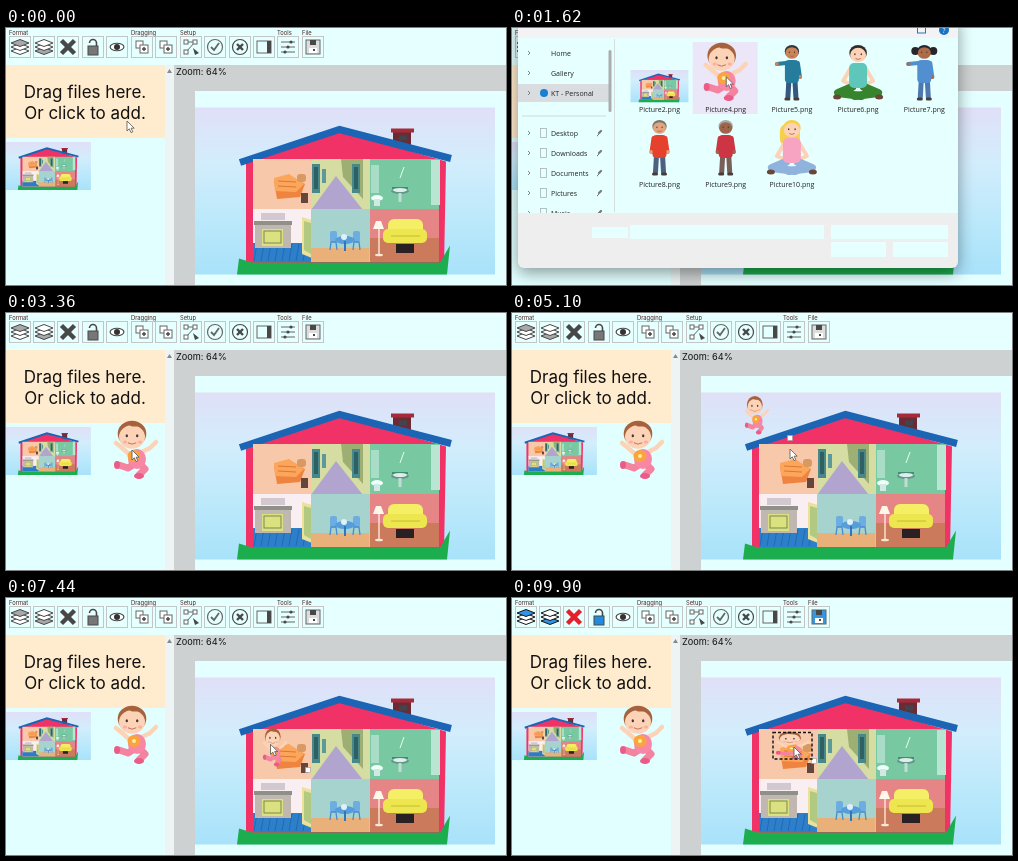
An HTML page with a canvas that plays this animation: 500 by 257 pixels, repeating every 9960 ms.

```html
<!DOCTYPE html>
<html lang="en">
<head>
<meta charset="utf-8">
<title>Doll house editor</title>
<style>
html, body { margin: 0; width: 100%; height: 100%; overflow: hidden; background: #e0ffff; }
canvas { display: block; width: 500px; height: 257px; }
</style>
</head>
<body>
<canvas id="stage" width="500" height="257"></canvas>
<script>
const LOOP = 9960, GLIDE = 600;
const UI = 'Inter, Arial, sans-serif';
const SYS = '"Open Sans", "Noto Sans", sans-serif';
const SKIN = '#fcd3b6', PAPER = '#e6ffff', INK = '#484848';
const c = document.getElementById('stage').getContext('2d');

const mix = (a, b, u) => a + (b - a) * u;
function ease(t, from, to) {
  const u = Math.min(1, Math.max(0, (t - from) / (to - from)));
  return u * u * (3 - 2 * u);
}
function rect(x, y, w, h, fill, r = 0) {
  c.fillStyle = fill;
  c.beginPath();
  c.roundRect(x, y, w, h, r);
  c.fill();
}
function oval(x, y, rx, ry, fill) {
  c.fillStyle = fill;
  c.beginPath();
  c.ellipse(x, y, rx, ry, 0, 0, 7);
  c.fill();
}
function trace(pts) {
  c.beginPath();
  for (let i = 0; i < pts.length; i += 2) c.lineTo(pts[i], pts[i + 1]);
}
function poly(fill, ...pts) {
  trace(pts);
  c.fillStyle = fill;
  c.fill();
}
function line(color, width, ...pts) {
  trace(pts);
  c.strokeStyle = color;
  c.lineWidth = width;
  c.stroke();
}
function limb(...args) {
  c.lineCap = c.lineJoin = 'round';
  line(...args);
  c.lineCap = 'butt';
  c.lineJoin = 'miter';
}
function frame(x, y, w, h, color, width = 1) {
  c.strokeStyle = color;
  c.lineWidth = width;
  c.strokeRect(x, y, w, h);
}
function ring(r, color, width) {
  c.strokeStyle = color;
  c.lineWidth = width;
  c.beginPath();
  c.arc(0, 0, r, 0, 7);
  c.stroke();
}
function text(str, x, y, size, family = UI, align = 'left', color = '#111') {
  c.font = `${size}px ${family}`;
  c.fillStyle = color;
  c.textAlign = align;
  c.fillText(str, x, y);
}
function at(x, y, sx, sy, draw) {
  c.save();
  c.translate(x, y);
  c.scale(sx, sy);
  draw();
  c.restore();
}

// Each room is drawn in its own 60 x 51 box
const rooms = [
  ['#f8c8aa', bedroom], ['#d5dda3', hall], ['#78c8a2', bathroom],
  ['#f9eef2', kitchen], ['#a6d3cd', dining], ['#e58585', lounge]
];
function bedroom() {
  poly('#ee8440', 21, 22, 36, 16, 52, 25, 47, 38, 24, 40);
  poly('#fca65c', 21, 19, 36, 15, 51, 25, 43, 33, 22, 32);
  for (const y of [22, 27]) line('#dc7834', 1, 25, y, 43, y + 1);
  rect(44, 15, 9, 8, '#d89a62', 3);
  rect(48, 34, 7, 10, '#65463a');
}
function hall() {
  poly('#9daf72', 30, 0, 52, 0, 52, 40, 32, 18);
  for (const x of [1, 41]) {
    rect(x, 5, 8, 29, '#47888a');
    rect(x + 2, 8, 4, 22, '#2e6064');
  }
  rect(11, 10, 4, 14, '#5b999a');
  poly('#b1a5d0', 25, 17, 52, 51, 0, 51);
}
function bathroom() {
  rect(61, 1, 9, 45, '#b9e6d2');
  rect(1, 6, 8, 28, '#a9ddc8');
  line('#e4fff2', 1, 34, 8, 30, 19);
  line('#448c78', 2, 22, 29, 38, 29);
  oval(30, 32, 9, 3, '#67958c');
  oval(30, 31, 7, 2, '#dcefe9');
  line('#c2dcd5', 3, 30, 34, 30, 43);
  oval(7, 39, 6, 3, '#effff9');
  rect(4, 40, 6, 7, '#d2e8e2');
}
function kitchen() {
  rect(0, 34, 59, 19, '#2e7fca');
  for (let x = 4; x < 59; x += 7) line('#1d65ae', .8, x, 35, x - 3, 52);
  rect(2, 13, 36, 26, '#c0b8b0');
  rect(1, 12, 38, 4, '#8f9188');
  rect(9, 20, 21, 17, '#dbe17e');
  frame(11, 22, 17, 12, '#7d8758');
  rect(8, 4, 24, 7, '#d1c8d0');
  poly('#ece19b', 49, 8, 59, 11, 59, 49, 49, 45);
  poly('#b2c982', 51, 12, 58, 14, 58, 45, 51, 41);
}
function dining() {
  rect(0, 39, 58, 14, '#e9b179');
  for (const x of [22, 45]) {
    rect(x - 3, 22, 7, 11, '#6caee3', 2);
    line('#4a8ccb', 1.3, x - 3, 41, x - 2, 33, x + 3, 33, x + 4, 41);
  }
  oval(34, 31, 10, 4, '#569ddb');
  line('#3276b8', 2, 34, 32, 34, 42);
  oval(33, 28, 3, 3, '#dff0fa');
}
function lounge() {
  rect(0, 29, 69, 24, '#cb7a5c');
  rect(18, 10, 35, 19, '#f4ef64', 6);
  rect(13, 20, 44, 14, '#eee64f', 5);
  line('#c4ba36', 1, 21, 27, 50, 27);
  line('#fff0e0', 1.3, 9, 18, 9, 45);
  poly('#fff8ea', 6, 12, 11, 12, 14, 20, 3, 20);
  oval(9, 46, 4, 1.3, '#f7e8d5');
  rect(26, 35, 18, 9, '#292024');
}

// The picture: 300 x 167
function house() {
  const sky = c.createLinearGradient(0, 0, 0, 167);
  ['#e0e0f7', '#d2edfc', '#bce9fb', '#a8e2fa'].forEach((color, i) => sky.addColorStop(i / 3, color));
  rect(0, 0, 300, 167, sky);
  rect(198, 24, 18, 20, '#6b2b35');
  rect(196, 21, 23, 4, '#a62a3a');
  rect(204, 28, 8, 5, '#43454d');
  poly('#f03266', 144.5, 23, 251, 54, 249, 159, 51, 159, 51, 54);
  line('#1c64b4', 7, 45, 55, 144.5, 22, 256, 51);
  poly('#1cad4e', 42, 167, 44, 151, 57, 155, 245, 155, 255, 138, 252, 167);
  rooms.forEach(([wall, furnish], i) => {
    const x = [58, 116, 175][i % 3], y = i < 3 ? 51.5 : 101.5;
    rect(x, y, i % 3 < 2 ? 59 : 69, 53, wall);
    at(x, y, 1, 1, furnish);
  });
}

function face(x, y, r, hair, skin = SKIN) {
  oval(x, y - r * .25, r * 1.1, r, hair);
  oval(x, y, r, r * .9, skin);
  for (const side of [-1, 1]) oval(x + side * r * .4, y - r * .1, r * .09, r * .12, '#443333');
  limb('#b85a50', .8, x - r * .3, y + r * .45, x, y + r * .55, x + r * .3, y + r * .45);
}

// Figures are about 56 tall and centred on the origin
function baby() {
  limb(SKIN, 4.5, -7, 3, -15, -4, -20, -8);
  limb(SKIN, 4.5, 4, 2, 14, -3, 20, -9);
  limb('#f4839f', 7, 0, 12, -8, 17, -17, 14);
  limb('#f4839f', 7, 3, 12, 9, 18, 3, 24);
  oval(-19, 14, 3, 4, '#ea5c87');
  oval(3, 25, 5, 3, '#ea5c87');
  oval(1, 8, 9, 10, '#f787a5');
  oval(-2, 5, 6.5, 6, '#fba43e');
  oval(-2, 5, 2, 2, '#fff0a0');
  face(-4, -14, 13, '#a5623c');
  oval(-1, -26, 5, 1.5, '#a5623c');
  for (const x of [-11, 4]) oval(x, -9, 2.2, 1.6, '#f9b0a4');
}
function standing(hair, shirt, legs, skin, reach = 0) {
  for (const side of [-1, 1]) {
    limb(legs, 5, side * 3, 7, side * 4, 24);
    limb('#493c38', 3, side * 3, 26, side * 6, 26);
    const hand = side < 0 && reach ? [-7 - reach, -9] : [side * 8, 4];
    limb(shirt, 4, side * 6, -10, ...hand);
    oval(...hand, 2, 2, skin);
  }
  rect(-7, -13, 14, 23, shirt, 4);
  face(0, -20, 6.5, hair, skin);
}
function sitting(hair, shirt, legs) {
  for (const side of [-1, 1]) {
    limb(SKIN, 4, side * 8, -4, side * 15, 8, side * 6, 12);
    limb(legs, 8, side * 6, 14, side * 20, 20, side * -3, 23);
    oval(side * 21, 24, 4, 2.5, '#694636');
  }
  rect(-9, -10, 18, 25, shirt, 5);
  face(0, -18, 8, hair);
}
function bunches() {
  for (const x of [-9, 9]) oval(x, -22, 4, 4, '#26252b');
  standing('#26252b', '#518fd0', '#4f78b0', '#ad6d48', 9);
}
function longHair() {
  rect(-12, -24, 20, 22, '#f6d04d', 7);
  sitting('#f6d04d', '#f7a4c2', '#8fb3dd');
}
const people = [
  baby,
  () => standing('#343438', '#267c9c', '#365780', '#c98558', 8),
  () => sitting('#312b2a', '#5fc7b9', '#36852d'),
  bunches,
  () => standing('#77736e', '#e5412d', '#4c607f', '#e2a57e'),
  () => standing('#a9a9a9', '#cd3545', '#785f58', '#9d6549'),
  longHair
];

// Toolbar icons are centred on the origin
function layers(filled) {
  return tint => {
    for (let i = 2; i >= 0; i--) {
      const y = i * 4 - 4;
      const fill = i === filled ? tint('#2f93e6', '#a8a8a8') : '#fff';
      const sheet = [-9, y, 0, y - 3.5, 9, y, 0, y + 3.5, -9, y];
      poly(fill, ...sheet);
      line(tint('#161616', INK), 1, ...sheet);
    }
  };
}
function cross(color, width, r) {
  line(color, width, -r, -r, r, r);
  line(color, width, r, -r, -r, r);
}
function padlock(tint) {
  c.strokeStyle = INK;
  c.lineWidth = 1.6;
  c.beginPath();
  c.arc(0, -4, 3.5, Math.PI, 0);
  c.lineTo(3.5, 0);
  c.stroke();
  rect(-5, -1, 10, 9, tint('#218be0', '#777'), 1);
  frame(-5, -1, 10, 9, INK);
}
function eye() {
  oval(0, 0, 7.5, 4.2, INK);
  oval(0, 0, 6.3, 3.2, '#fff');
  oval(0, 0, 3, 3, '#333');
}
function copies() {
  for (const [p, size] of [[-6, 7], [-2, 8]]) {
    rect(p, p, size, size, '#fff');
    frame(p, p, size, size, '#666');
  }
  line(INK, 1.5, 0, 2, 4, 2);
  line(INK, 1.5, 2, 0, 2, 4);
}
function nodes() {
  line('#666', 1, -5, 5, 4, -5, -5, -5);
  for (const [x, y] of [[-5, -5], [4, -5], [-5, 5]]) {
    rect(x - 2, y - 2, 4, 4, '#fff');
    frame(x - 2, y - 2, 4, 4, '#666');
  }
  poly(INK, 2, 1, 8, 6, 4, 8);
}
function sliders() {
  for (let i = -1; i < 2; i++) {
    line('#666', 1, -7, i * 5, 7, i * 5);
    oval(i * -3, i * 5, 1.6, 1.6, INK);
  }
}
function floppy(tint) {
  rect(-7, -7, 14, 14, tint('#3596e2', '#ddd'), 1);
  frame(-7, -7, 14, 14, '#666');
  rect(-3, -7, 6, 5, INK);
  rect(-4, 1, 8, 5, '#fff');
  rect(0, 2, 2, 2, INK);
}
const icons = [
  layers(0), layers(2),
  tint => cross(tint('#e5202a', INK), 4.5, 6.5),
  padlock, eye, copies, copies, nodes,
  () => { ring(7.5, '#666', 1.2); line('#666', 1.8, -4, 0, -1, 3, 4, -4); },
  () => { ring(7.5, INK, 1.2); cross(INK, 2.4, 3); },
  () => { frame(-7, -6, 14, 12, '#666'); rect(3, -6, 4, 12, INK); },
  sliders, floppy
];
const groups = { Format: 0, Dragging: 5, Setup: 7, Tools: 11, File: 12 };
const buttonX = i => Math.floor(3 + 24.45 * i);

function toolbar(active) {
  const tint = (on, off) => active ? on : off;
  rect(0, 0, 500, 37, PAPER);
  icons.forEach((icon, i) => {
    frame(buttonX(i) + .5, 8.5, 21, 21, '#c2c6c6');
    at(buttonX(i) + 11, 19, 1, 1, () => icon(tint));
  });
  for (const name in groups) text(name, buttonX(groups[name]), 6.6, 5.8, UI, 'left', '#4a2222');
}
function page(t, active) {
  rect(0, 0, 500, 257, '#e2ffff');
  toolbar(active);
  rect(0, 37, 159, 73, '#ffebcd');
  text('Drag files here.', 79, 69.6, 17, UI, 'center');
  text('Or click to add.', 79, 90.6, 17, UI, 'center');
  at(0, 114, .283, .287, house);
  if (t > 2500) at(130, 138, 1, 1, baby);
  rect(159, 37, 9, 220, '#eef4f4');
  poly('#888', 161, 45, 163.5, 41, 166, 45);
  rect(168, 37, 332, 220, '#cdd1d1');
  text('Zoom: 64%', 170, 46.8, 9.2);
  rect(189, 63, 311, 194, '#e4ffff');
  at(189, 79.5, 1, 1, house);
}

function sidebar() {
  c.save();
  c.beginPath();
  c.rect(6, 10, 95, 175);
  c.clip();
  rect(6, 56, 91, 18, '#d9dde0');
  const names = ['Home', 'Gallery', 'KT - Personal', '', 'Desktop', 'Downloads', 'Documents', 'Pictures', 'Music'];
  names.forEach((name, i) => {
    const y = 25 + i * 20;
    if (!name) return line('#d3dada', 1, 10, y + 3, 94, y + 3);
    line('#666', .8, 16, y - 2, 18, y, 16, y + 2);
    text(name, 39, y + 2.7, 7, SYS, 'left', '#222');
    if (i < 4) return;
    frame(28.5, y - 4.5, 6, 9, '#aab3b5', .8);
    limb('#777', 1, 85, y + 3, 87, y + 1);
    limb('#777', 2.2, 87, y, 89, y - 2);
  });
  oval(32, 65, 4, 4, '#1680d2');
  c.restore();
  rect(96.5, 22, 3, 62, '#a9adad', 1.5);
  line('#d5dddd', 1, 102.5, 11, 102.5, 184);
}
function files(mx, my) {
  for (let i = 0; i < 8; i++) {
    const x = 147.5 + (i % 5) * 66.2, y = i < 5 ? 45 : 120;
    if (Math.abs(mx - x) < 33 && Math.abs(my - y - 5) < 36) rect(x - 33, y - 31, 65, 72, '#ebe6f8');
    if (i) at(x, y, 1, 1, people[i - 1]);
    else at(x - 29, 42, .193, .193, house);
    text(`Picture${i ? i + 3 : 2}.png`, x, y + 39, 7, SYS, 'center', '#222');
  }
}
function dialog(mx, my) {
  c.save();
  c.shadowColor = 'rgba(0,0,0,.4)';
  c.shadowBlur = 16;
  c.shadowOffsetY = 5;
  rect(6, -12, 440, 252, '#eeeeee', 6);
  c.restore();
  rect(6, 0, 440, 10, '#f3f3f6');
  rect(6, 10, 440, 175, PAPER);
  frame(405.5, -3, 8, 8, '#2477bd');
  oval(432, 2, 5, 5, '#1672c4');
  text('?', 432, 4.5, 7, SYS, 'center', '#fff');
  sidebar();
  files(mx, my);
  rect(80, 199, 36, 11, PAPER);
  rect(118, 197, 194, 14, PAPER);
  rect(319, 197, 117, 14, PAPER);
  for (const x of [319, 381]) rect(x, 214, 55, 15, PAPER);
}

// Stops: arrival time and tip; each move takes GLIDE ms
const stops = [
  [0, 121, 93], [1640, 214, 48], [2120, 221, 58], [3120, 126, 137],
  [4060, 240, 99], [5090, 278, 136], [5900, 240, 99], [6900, 264, 146],
  [8000, 302, 172], [9000, 302, 163], [9600, 282, 149]
];
function cursorAt(t) {
  let [, x, y] = stops[0];
  for (const [arrival, nx, ny] of stops.slice(1)) {
    const u = ease(t, arrival - GLIDE, arrival);
    x = mix(x, nx, u);
    y = mix(y, ny, u);
  }
  return [x, y];
}
function handle(x, y) {
  rect(x - 2.5, y - 2.5, 5, 5, '#fff');
  frame(x - 2.5, y - 2.5, 5, 5, '#999', .6);
}
function placedBaby(t) {
  // Moves with the cursor while dragged, then flattens with the corner handle
  const [x, y] = cursorAt(t < 6300 ? Math.min(t, 4060) : Math.min(t, 6900));
  const u = ease(t, 8400, 9000);
  at(mix(x + 5, 281, u), mix(y + 4, 148, u), mix(.55, .78, u), mix(.66, .48, u), baby);
  if (t > 4060) handle(x + 38, mix(y + 26, 163, u));
}
function pointer(x, y) {
  const arrow = [0, 0, 0, 10, 2.3, 7.8, 4, 11.6, 5.8, 10.8, 4.1, 7.2, 7.2, 7.2, 0, 0];
  at(x, y, 1, 1, () => {
    poly('#fff', ...arrow);
    line('#555', .8, ...arrow);
  });
}

function draw(t) {
  const active = t >= 9400;
  const [mx, my] = cursorAt(t);
  page(t, active);
  if (t >= 3460) {
    c.globalAlpha = t < 4060 ? .6 : 1;
    placedBaby(t);
    c.globalAlpha = 1;
  }
  if (active) {
    c.setLineDash([3, 2]);
    frame(261, 134.5, 39, 26.5, '#111', 1.4);
    c.setLineDash([]);
  }
  if (t >= 600 && t < 1880) {
    c.globalAlpha = ease(t, 600, 750);
    dialog(mx, my);
    c.globalAlpha = 1;
  }
  pointer(mx, my);
}

const start = performance.now();
function tick() {
  draw((performance.now() - start) % LOOP);
  requestAnimationFrame(tick);
}
tick();
</script>
</body>
</html>
```
